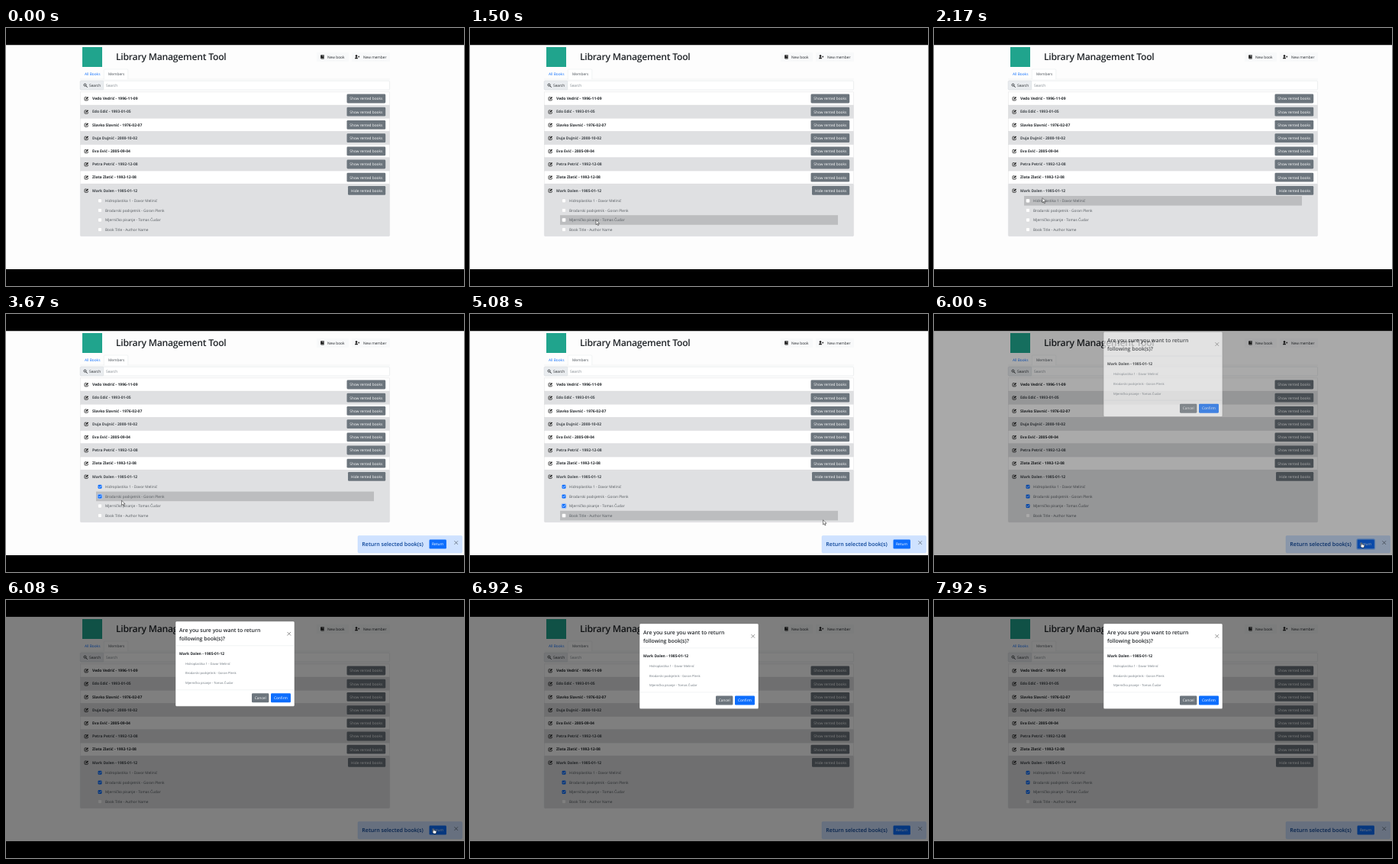
These frames come from a looping animation (600 px wide and 338 px high, 8000 ms). An HTML page:

```html
<!DOCTYPE html>
<html lang="en">
<head>
<meta charset="utf-8">
<title>Library Management Tool</title>
<style>
html, body { margin: 0; width: 100%; height: 100%; overflow: hidden; background: #000; }
svg { display: block; width: 100vw; height: 100vh; }
text { font-family: "Open Sans", "Noto Sans", sans-serif; text-rendering: geometricPrecision; white-space: pre; }
</style>
</head>
<body>
<svg id="stage" viewBox="0 0 600 338" xmlns="http://www.w3.org/2000/svg"></svg>
<script>
const BLUE = '#0d6efd', GREY = '#6c757d', INK = '#212529', MUTED = '#41464b';
const members = [
  'Vedo Vedrić - 1996-11-09', 'Edo Edić - 1993-01-05', 'Slavko Slavnić - 1976-02-07',
  'Duja Dujnić - 2000-10-02', 'Eva Ević - 2005-09-04', 'Petra Petrić - 1992-12-08',
  'Zlata Zlatić - 1992-12-08', 'Mark Dalen - 1985-01-12'
];
const books = [
  'Hidroplastika 1 - Davor Melinić', 'Brodarski podsjetnik - Goran Plenk',
  'Mjerničko pisanje - Tomas Čudar', 'Book Title - Author Name'
];
const ROW = 17.2, ITEM = 12.6, LIST_Y = 83.9, ITEMS_Y = 220;

const rect = (x, y, w, h, fill, more = '') =>
  `<rect x="${x}" y="${y}" width="${w}" height="${h}" fill="${fill}" ${more}/>`;
const line = (x1, y, x2, color) =>
  `<path d="M${x1} ${y}H${x2}" stroke="${color}" stroke-width=".4"/>`;
// y is the middle of the capital letters
const text = (x, y, str, size = 4.8, fill = INK, weight = 400, more = '') =>
  `<text x="${x}" y="${y + size * 0.357}" font-size="${size}" fill="${fill}" font-weight="${weight}" ${more}>${str}</text>`;
const button = (x, y, w, h, label, fill, id = '') =>
  rect(x, y, w, h, fill, `rx="1.3" ${id}`) +
  text(x + w / 2, y + h / 2 + 0.1, label, 4.8, '#fff', 400, 'text-anchor="middle"');
const cross = (x, y, r, color) =>
  `<path d="M${x - r} ${y - r}l${2 * r} ${2 * r}m0 ${-2 * r}l${-2 * r} ${2 * r}" stroke="${color}" stroke-width=".8" stroke-linecap="round"/>`;
const icon = (x, y, body) => `<g transform="translate(${x} ${y})">${body}</g>`;

const pencil =
  `<path d="M3 .8H1.1Q.4 .8 .4 1.5V4.4Q.4 5.1 1.1 5.1H4Q4.7 5.1 4.7 4.4V3.1" fill="none" stroke="#111" stroke-width=".75"/>
   <path d="M1.8 3.8L2 2.6 4.4.2 5.4 1.2 3 3.6Z" fill="#111"/>`;
const lens =
  `<circle cx="2" cy="2" r="1.5" fill="none" stroke="${INK}" stroke-width=".85"/>
   <path d="M3.1 3.1L4.8 4.8" stroke="${INK}" stroke-width="1" stroke-linecap="round"/>`;
const book =
  `<path d="M.8 0H4.6V5.2H.9Q.2 5.1.2 4.4V.7Q.2.1.8 0Z" fill="#111"/>
   <path d="M.9 4.4H4.4M2.2 0V2.1L2.8 1.6 3.4 2.1V0" fill="none" stroke="#f8f9fa" stroke-width=".4"/>`;
const person =
  `<circle cx="2" cy="1.4" r="1.3" fill="#111"/><path d="M0 5Q0 3.1 2 3.1T4 5Z" fill="#111"/>
   <path d="M4.1 2.4H6.3M5.2 1.3V3.5" stroke="#111" stroke-width=".65"/>`;

function header() {
  return rect(100, 25, 26, 26, '#20a48d') +
    text(144, 37.4, 'Library Management Tool', 12.2, INK, 600, 'letter-spacing="-.25"') +
    rect(407, 32, 42, 12, '#f8f9fa', 'rx="1.3"') + icon(412, 35.2, book) + text(421, 38, 'New book') +
    rect(453, 32, 50, 12, '#f8f9fa', 'rx="1.3"') + icon(457, 35.2, person) + text(468, 38, 'New member') +
    line(97, 67, 502.7, '#dee2e6') +
    '<path d="M128.3 67.2V55.3Q128.3 54 129.6 54H158.5Q159.8 54 159.8 55.3V67.2" fill="#fff" stroke="#dee2e6" stroke-width=".4"/>' +
    text(103, 60.4, 'All Books', 4.8, BLUE) + text(134, 60.4, 'Members', 4.8, '#495057') +
    rect(97.3, 69.2, 405.3, 11.8, '#fff', 'rx="1.3" stroke="#ced4da" stroke-width=".4"') +
    rect(97.3, 69.2, 30.5, 11.8, '#e9ecef', 'rx="1.3" stroke="#ced4da" stroke-width=".4"') +
    icon(101.5, 72.6, lens) + text(109, 75.2, 'Search') + text(131, 75.2, 'Search', 4.8, '#7b838a');
}

function memberRow(name, i) {
  const y = LIST_Y + ROW * i, mid = y + 8.6, last = i === 7, shaded = i % 2;
  const h = last ? 68.4 : ROW;
  return rect(97.3, y, 405.3, h, shaded ? '#dfe0e2' : '#fff', `rx="${last ? 1.3 : 0}" stroke="#d3d4d6" stroke-width=".35"`) +
    icon(102.6, mid - 2.7, pencil) +
    text(113, mid, name, 5, shaded ? MUTED : INK, 700) +
    (last ? button(448, mid - 5.9, 49.2, 11.8, 'Hide rented books', GREY)
          : button(446.5, mid - 5.9, 50.7, 11.8, 'Show rented books', GREY));
}

function bookRow(name, i) {
  const y = ITEMS_Y + ITEM * i, mid = y + 6.3;
  return rect(118, y, 364, ITEM, '#bcbdbf', `id="hover${i}"`) +
    rect(119.9, mid - 3.1, 6.2, 6.2, 'none', `id="ring${i}" rx="1.7" stroke="#a9c6f5" stroke-width="1.2"`) +
    rect(120.6, mid - 2.4, 4.8, 4.8, '#fff', 'rx="1.1" stroke="#c4c5c7" stroke-width=".3"') +
    `<g id="tick${i}">` + rect(120.5, mid - 2.5, 5, 5, BLUE, 'rx="1.2"') +
    `<path d="M121.7 ${mid + 0.1}l.9 .9 1.8-1.9" fill="none" stroke="#fff" stroke-width=".75" stroke-linecap="round"/></g>` +
    text(130, mid, name, 4.8, '#53585d');
}

function toast() {
  return '<g id="toast">' +
    rect(461, 290.6, 136.6, 22.3, '#cfe2ff', 'rx="1.4" stroke="#b6d4fe" stroke-width=".4"') +
    text(466.3, 301, 'Return selected book(s)', 7.08, '#084298', 600) +
    rect(553.9, 295, 23.6, 13.2, 'none', 'id="glow" rx="1.9" stroke="#86b8fe" stroke-width="1.3"') +
    button(554.5, 295.6, 22.4, 12, 'Return', BLUE, 'id="ret"') +
    cross(589.7, 299.6, 2, '#5c6675') + '</g>';
}

function modal() {
  return '<g id="modal">' +
    rect(222.1, 31.1, 155.8, 111.3, '#fff', 'rx="1.5" stroke="#777" stroke-width=".3"') +
    text(227, 42.5, 'Are you sure you want to return', 6.92, INK, 600) +
    text(227, 53.6, 'following book(s)?', 6.92, INK, 600) +
    cross(370.8, 47.4, 2, '#777') + line(222.3, 62.9, 377.7, '#dee2e6') +
    text(227, 73, members[7], 5, INK, 700) +
    books.slice(0, 3).map((b, i) => text(235, 86.3 + 12.8 * i, b, 4.13, GREY)).join('') +
    line(222.3, 120.9, 377.7, '#dee2e6') +
    button(322, 125.5, 22.4, 12, 'Cancel', GREY) + button(347, 125.5, 26, 12, 'Confirm', BLUE) + '</g>';
}

const stage = document.getElementById('stage');
stage.innerHTML =
  '<clipPath id="page"><rect y="22.3" width="600" height="293.7"/></clipPath>' +
  rect(0, 0, 600, 338, '#000') + '<g clip-path="url(#page)">' +
  rect(0, 22, 600, 295, '#fdfdfd') + header() +
  members.map(memberRow).join('') + books.map(bookRow).join('') + toast() +
  rect(0, 22, 600, 295, '#000', 'id="shade"') + modal() +
  `<g id="cursor" fill="#fff" stroke="#111" stroke-width=".5" stroke-linejoin="round">
     <path id="arrow" d="M0 0V6.2L1.5 4.9 2.5 7.2 3.5 6.8 2.5 4.5H4.5Z"/>
     <path id="hand" d="M0 .5Q.6-.2 1.2.5V2.4L4 3Q4.5 3.2 4.4 3.8L3.8 6.6H.7L-1.2 4.1Q-1 3.3 0 3.9Z"/>
   </g></g>`;

const $ = id => document.getElementById(id);
const clamp = v => Math.max(0, Math.min(1, v));
const ramp = (t, from, span) => clamp((t - from) / span);
const fade = (id, v) => $(id).setAttribute('opacity', v);

// time, x, y
const path = [
  [990, 205, 299], [1350, 172, 262], [1750, 150, 229], [2160, 142, 222.6], [2700, 142, 222.6],
  [3400, 151.5, 244.3], [3750, 151.5, 244.3], [4150, 150, 253], [4400, 150, 253],
  [4650, 215, 262], [5070, 462.5, 269.8], [5160, 462.5, 269.8], [5650, 559.5, 299.5],
  [6500, 559.5, 299.5], [6850, 568, 318]
];
const checkAt = [2575, 3540, 4300];

function cursorAt(t) {
  let i = 0;
  while (i < path.length - 2 && t >= path[i + 1][0]) i++;
  const [a, b] = [path[i], path[i + 1]];
  const u = ramp(t, a[0], b[0] - a[0]), e = u * u * (3 - 2 * u);
  return [a[1] + (b[1] - a[1]) * e, a[2] + (b[2] - a[2]) * e];
}

function draw(ms) {
  // the screen refreshes twelve times a second
  const t = Math.floor((ms + 4) * 0.012) / 0.012;
  const [x, y] = cursorAt(t);
  const shown = t >= 990 && t < 6850;
  const over = shown && x >= 118 && x <= 482 ? Math.floor((y - ITEMS_Y) / ITEM) : -1;
  const onReturn = shown && x > 554 && x < 577 && y > 295 && y < 308;

  books.forEach((_, i) => {
    const at = checkAt[i] || Infinity, next = checkAt[i + 1] || 5880;
    fade('hover' + i, over === i ? 1 : 0);
    fade('tick' + i, t >= at ? 1 : 0);
    fade('ring' + i, ramp(t, at + 30, 120) * (1 - ramp(t, next, 120)));
  });

  fade('toast', ramp(t, 2700, 150));
  $('ret').setAttribute('fill', onReturn && t < 6000 ? '#0b5ed7' : BLUE);
  fade('glow', t >= 5880 && t < 6050 ? 1 : 0);

  const veil = ramp(t, 5900, 150), drop = 15.6 * Math.pow(1 - ramp(t, 5900, 300), 1.7);
  fade('shade', veil * 0.5);
  fade('modal', veil);
  $('modal').setAttribute('transform', `translate(0 ${-drop})`);

  fade('cursor', shown ? 1 : 0);
  $('cursor').setAttribute('transform', `translate(${x} ${y})`);
  fade('arrow', onReturn ? 0 : 1);
  fade('hand', onReturn ? 1 : 0);
}

const start = performance.now();
function tick() {
  draw((performance.now() - start) % 8000);
  requestAnimationFrame(tick);
}
draw(0);
requestAnimationFrame(tick);
</script>
</body>
</html>
```
